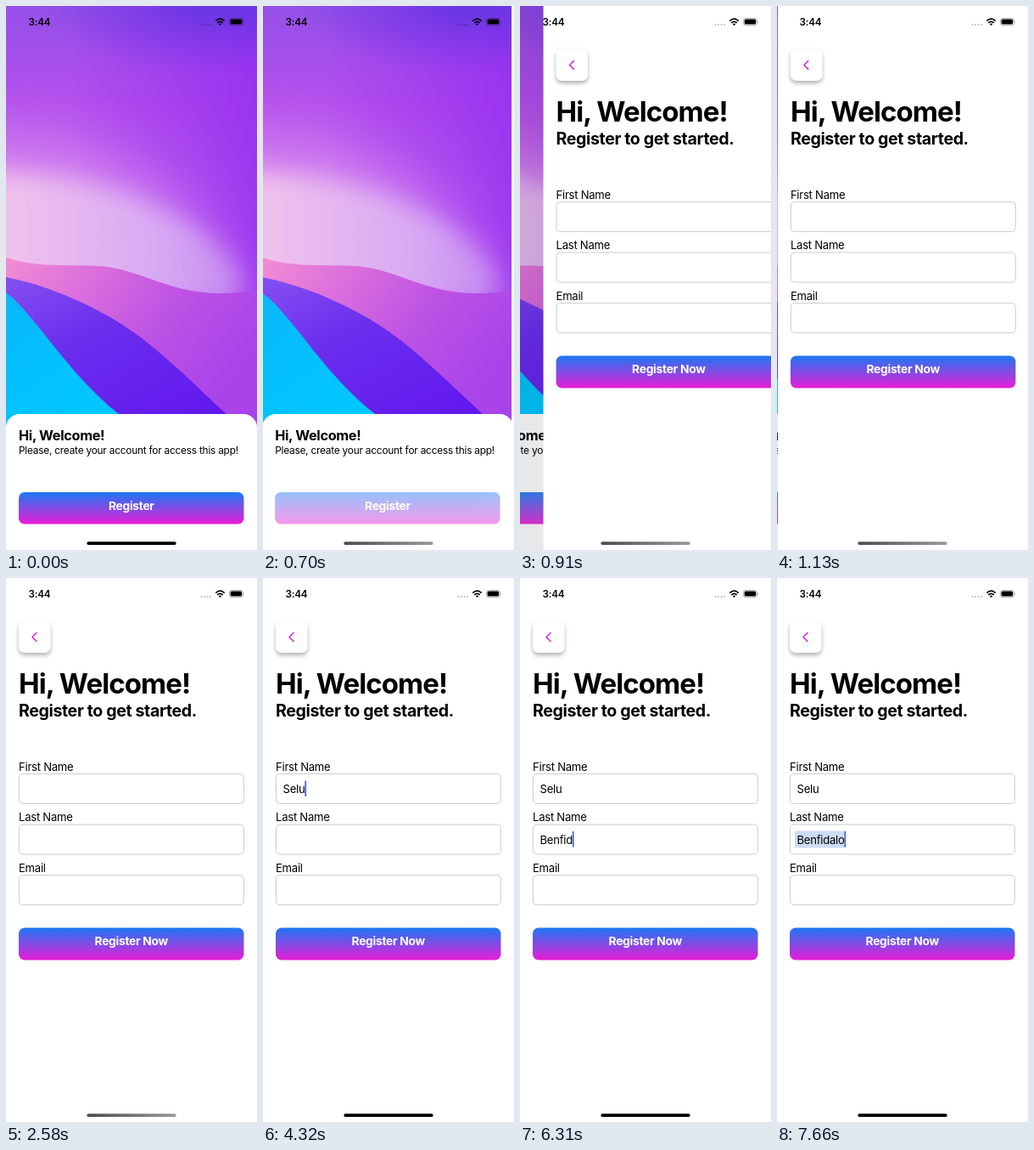
Animation, 296 px wide and 640 px high, one loop 8000 ms. Source, as an HTML page:

```html
<!DOCTYPE html>
<html lang="en">
<head>
<meta charset="utf-8">
<title>Register flow</title>
<style>
  html, body { margin: 0; width: 100%; height: 100%; overflow: hidden; background: #fff; }
  svg { display: block; width: 296px; height: 640px; }
  text { font: 400 13.1px Inter, "Liberation Sans", sans-serif; letter-spacing: -.02em; fill: #000; }
  .title { font-weight: 700; font-size: 33px; letter-spacing: -.028em; }
  .sub { font-weight: 700; font-size: 19.6px; }
  .hello { font-weight: 700; font-size: 16.3px; }
  .note { font-size: 11.9px; }
  .cta { font-weight: 650; font-size: 13.8px; fill: #fff; text-anchor: middle; }
  .clock { font-weight: 600; font-size: 11.7px; }
  .field { fill: #fff; stroke: #c6c6c8; stroke-width: .9; }
  .shadow { filter: drop-shadow(0 3px 2.5px rgba(0, 0, 0, .3)); }
</style>
</head>
<body>
<svg viewBox="0 0 296 640">
  <defs>
    <linearGradient id="btn" x2="0" y2="1">
      <stop offset="0" stop-color="#1b78f4"/><stop offset=".5" stop-color="#824be4"/><stop offset="1" stop-color="#e81cd6"/>
    </linearGradient>
    <linearGradient id="sky" x2="0" y2="1">
      <stop offset="0" stop-color="#9450e8"/><stop offset=".22" stop-color="#b450ec"/>
      <stop offset=".42" stop-color="#c468ee"/><stop offset="1" stop-color="#b060f0"/>
    </linearGradient>
    <linearGradient id="side">
      <stop offset=".25" stop-color="#942cf0" stop-opacity="0"/><stop offset="1" stop-color="#942cf0" stop-opacity=".8"/>
    </linearGradient>
    <radialGradient id="corner">
      <stop offset="0" stop-color="#5a34e0" stop-opacity=".8"/><stop offset="1" stop-color="#6a34e4" stop-opacity="0"/>
    </radialGradient>
    <linearGradient id="glow">
      <stop offset=".1" stop-color="#fcd2e4"/><stop offset=".4" stop-color="#ecc4f0"/>
      <stop offset=".75" stop-color="#d8b0f4"/><stop offset="1" stop-color="#c890f2"/>
    </linearGradient>
    <filter id="soft" x="-50%" y="-50%" width="200%" height="200%"><feGaussianBlur stdDeviation="14"/></filter>
    <filter id="haze" x="-50%" y="-50%" width="200%" height="200%"><feGaussianBlur stdDeviation="34"/></filter>
    <linearGradient id="pink" x2="1" y2=".5">
      <stop offset="0" stop-color="#f48cd2"/><stop offset=".3" stop-color="#dc70dc"/>
      <stop offset=".65" stop-color="#bc52e4"/><stop offset="1" stop-color="#a844ea"/>
    </linearGradient>
    <linearGradient id="violet" x2=".8" y2="1">
      <stop offset="0" stop-color="#8450f0"/><stop offset=".4" stop-color="#6a2eee"/><stop offset="1" stop-color="#6216ee"/>
    </linearGradient>
    <linearGradient id="cyan" x2=".6" y2="1">
      <stop offset="0" stop-color="#08b8f8"/><stop offset="1" stop-color="#00c8ff"/>
    </linearGradient>
    <linearGradient id="bar">
      <stop offset="0" stop-color="#4c4c4c"/><stop offset="1" stop-color="#9a9a9a"/>
    </linearGradient>
  </defs>

  <g id="welcome">
    <rect width="296" height="500" fill="url(#sky)"/>
    <rect width="296" height="500" fill="url(#side)"/>
    <ellipse cx="250" cy="0" rx="210" ry="80" fill="url(#corner)"/>
    <path d="M-80 150C60 150 220 200 270 330V420H-80Z" fill="#dc94f0" opacity=".65" filter="url(#haze)"/>
    <path d="M-80 196C70 186 216 226 274 312Q284 346 250 350H-80Z" fill="url(#glow)" opacity=".85" filter="url(#soft)"/>
    <path d="M0 296C36 308 74 304 110 306C158 309 192 338 252 338Q276 338 296 334V500H0Z" fill="url(#pink)"/>
    <path d="M0 319C46 328 88 346 126 368C174 396 214 438 262 482L282 500H0Z" fill="url(#violet)"/>
    <path d="M0 337C37 366 71 431 133 480L150 500H0Z" fill="url(#cyan)"/>
    <path d="M0 640V496A16 16 0 0 1 16 480H280A16 16 0 0 1 296 496V640Z" fill="#fff"/>
    <text class="hello" x="15" y="511">Hi, Welcome!</text>
    <text class="note" x="15" y="527">Please, create your account for access this app!</text>
    <g id="press">
      <rect x="15" y="572" width="265.5" height="37.5" rx="7" fill="url(#btn)"/>
      <text class="cta" x="147.8" y="592.5">Register</text>
    </g>
  </g>
  <rect id="dim" width="296" height="640" opacity="0"/>

  <g id="form">
    <rect width="296" height="640" fill="#fff"/>
    <rect class="shadow" x="15" y="50.5" width="37.5" height="37.5" rx="7" fill="#fff"/>
    <path d="M36 64.5L31 69.5L36 74.5" fill="none" stroke="#dc1ee0" stroke-width="1.5" stroke-linecap="round" stroke-linejoin="round"/>
    <text class="title" x="15" y="136">Hi, Welcome!</text>
    <text class="sub" x="15" y="163">Register to get started.</text>
    <text x="15" y="226.5">First Name</text>
    <rect class="field" x="15.4" y="230.4" width="265" height="35" rx="4.5"/>
    <text x="15" y="286">Last Name</text>
    <rect class="field" x="15.4" y="290" width="265" height="35" rx="4.5"/>
    <text x="15" y="346">Email</text>
    <rect class="field" x="15.4" y="349.6" width="265" height="35" rx="4.5"/>
    <rect id="mark" x="21" y="297.5" height="20" fill="#cddcf4"/>
    <text id="first" x="23.5" y="252.5"></text>
    <text id="last" x="23.5" y="312.5"></text>
    <rect id="caret" width="1.6" height="18.5" fill="#3d5be0"/>
    <rect x="15" y="411.5" width="265.5" height="38" rx="7" fill="url(#btn)"/>
    <text class="cta" x="147.8" y="432.3">Register Now</text>
  </g>

  <text class="clock" x="26.5" y="23">3:44</text>
  <g opacity=".25">
    <circle cx="230.5" cy="22" r="1.1"/><circle cx="234" cy="22" r="1.1"/>
    <circle cx="237.5" cy="22" r="1.1"/><circle cx="241" cy="22" r="1.1"/>
  </g>
  <g fill="none" stroke="#000" stroke-width="1.7">
    <path d="M247.3 17.6Q252.5 12.8 257.7 17.6M249.3 19.8Q252.5 16.8 255.7 19.8"/>
    <path d="M250.8 21.2Q252.5 19.8 254.2 21.2L252.5 23Z" fill="#000" stroke="none"/>
  </g>
  <rect x="263.4" y="14.4" width="16" height="8.4" rx="2.6" fill="none" stroke="#000" stroke-opacity=".38" stroke-width=".8"/>
  <rect x="264.6" y="15.6" width="13.6" height="6" rx="1.6"/>
  <path d="M280.4 17.2Q281.8 18.6 280.4 20Z" opacity=".4"/>
  <rect id="home" x="95.3" y="630.2" width="105.4" height="3.7" rx="1.85"/>
</svg>
<script>
const LOOP = 8000, WIDTH = 296;
const FIRST = "Selu", LAST = "Benfidalo";
const $ = id => document.getElementById(id);
const [welcome, press, dim, form, mark, first, last, caret, home] =
  ["welcome", "press", "dim", "form", "mark", "first", "last", "caret", "home"].map($);

// Slide moments and the opacity of the pressed button
const slide = [[0, 1], [500, .35], [700, .45], [810, .68], [910, .9], [1020, 1], [1130, 1], [2580, 1]];

// time, letters in first name, letters in last name, caret opacity, highlight
const typing = [
  [0, 0, 0, 0, 0], [3290, 0, 0, .5, 0], [3410, 0, 0, 1, 0],
  [3640, 1, 0, 1, 0], [3820, 2, 0, 1, 0], [3930, 3, 0, 1, 0], [4050, 4, 0, 1, 0],
  [4840, 4, 0, 1, 0], [5090, 4, 2, 1, 1], [5670, 4, 2, .5, 0], [5810, 4, 2, 1, 0],
  [6030, 4, 3, 1, 0], [6140, 4, 4, 1, 0], [6310, 4, 6, 1, 0], [6420, 4, 7, 1, 0],
  [6530, 4, 8, 1, 0], [6640, 4, 9, 1, 0], [6830, 4, 9, 1, 1], [7250, 4, 9, .5, 1],
  [7400, 4, 9, 0, 1], [7550, 4, 9, .5, 1], [7660, 4, 9, 1, 1]
];

const at = (steps, t) => steps.findLast(s => s[0] <= t);
const set = (el, attrs) => { for (const k in attrs) el.setAttribute(k, attrs[k]); };

// Critically damped spring: share of the slide still to go
function remaining(t) {
  if (t < 700) return 1;
  if (t >= 2580) return 0;
  const w = Math.sqrt(1000 / 3) * (t - 692) / 1000;
  return (1 + w) * Math.exp(-w);
}

function draw(t) {
  const [time, glow] = at(slide, t);
  const left = remaining(time);
  set(form, { transform: `translate(${WIDTH * left})` });
  set(welcome, { transform: `translate(${-.3 * WIDTH * (1 - left)})` });
  set(dim, { opacity: .1 * (1 - left) });
  set(press, { opacity: glow });
  set(home, { fill: t >= 700 && t < 4320 ? "url(#bar)" : "#000" });

  const [, a, b, blink, lit] = at(typing, t);
  first.textContent = FIRST.slice(0, a);
  last.textContent = LAST.slice(0, b);
  const low = t >= 4840;
  const end = 23.5 + (low ? (b && last.getComputedTextLength()) : (a && first.getComputedTextLength()));
  set(caret, { x: end, y: low ? 298 : 238.5, opacity: blink });
  set(mark, { width: end - 20, opacity: lit });
}

const start = performance.now();
function tick() {
  draw((performance.now() - start) % LOOP);
  requestAnimationFrame(tick);
}
tick();
</script>
</body>
</html>
```
